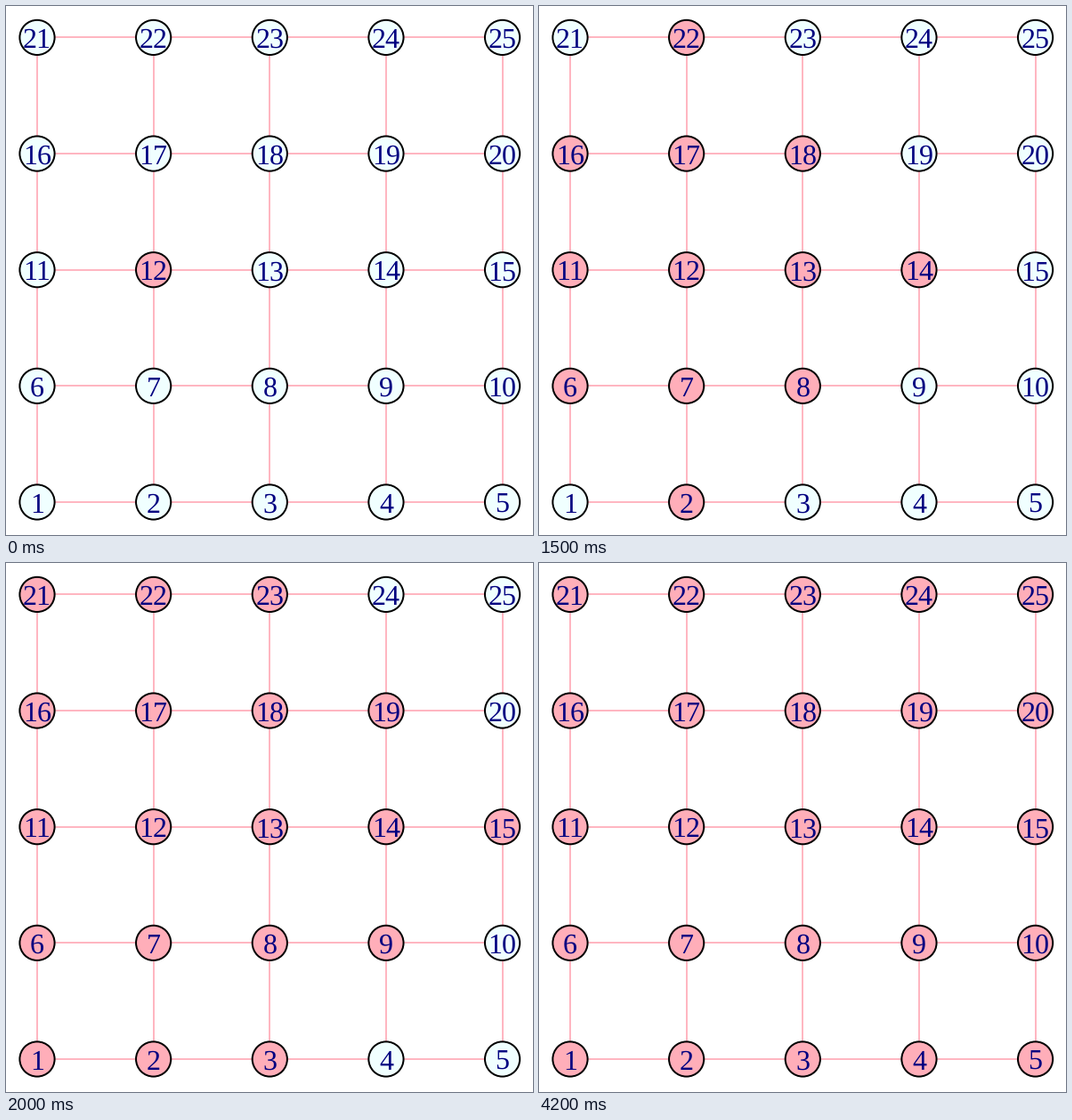
A matplotlib script that plays this animation: 592 by 595 pixels, repeating every 5 s.

```python
import matplotlib.pyplot as plt
from matplotlib.animation import FuncAnimation
from matplotlib.patches import Circle

W, H, DPI = 592, 595, 100
PX = 72 / DPI  # points per pixel

N = 5
LEFT, BOTTOM, GAP = 35.0, 558.0, 130.65
RADIUS = 19.6
START = (1, 2)  # column and row of node 12

IDLE, ACTIVE = "#f0ffff", "#ffaeb9"
EDGE, INK = "#ffb6c1", "#000080"

STEP_MS, FRAMES = 500, 10

plt.rcParams["text.hinting"] = "none"
plt.rcParams["toolbar"] = "None"

fig = plt.figure(figsize=(W / DPI, H / DPI), dpi=DPI, facecolor="white")
ax = fig.add_axes([0, 0, 1, 1])
ax.set_xlim(0, W)
ax.set_ylim(H, 0)
ax.axis("off")


def place(col, row):
    return LEFT + GAP * col, BOTTOM - GAP * row


def edge(a, b):
    (x0, y0), (x1, y1) = place(*a), place(*b)
    ax.plot([x0, x1], [y0, y1], color=EDGE, lw=2 * PX, zorder=1)


def node(col, row):
    x, y = place(col, row)
    disc = Circle((x, y), RADIUS, fc=IDLE, ec="black", lw=2 * PX, zorder=2)
    ax.add_patch(disc)
    ax.text(x, y + 11.5, str(row * N + col + 1), color=INK, ha="center",
            va="baseline", family="Liberation Serif", size=32 * PX, zorder=3)
    return disc


for k in range(N):
    edge((0, k), (N - 1, k))
    edge((k, 0), (k, N - 1))

nodes = {(c, r): node(c, r) for r in range(N) for c in range(N)}


def distance(col, row):
    return abs(col - START[0]) + abs(row - START[1])


def update(i):
    """The wave rests for two ticks, then spreads one edge per tick."""
    reach = max(0, i - 1)
    for pos, disc in nodes.items():
        disc.set_facecolor(ACTIVE if distance(*pos) <= reach else IDLE)
    return list(nodes.values())


anim = FuncAnimation(fig, update, frames=FRAMES, init_func=lambda: update(0),
                     interval=STEP_MS, repeat=True, repeat_delay=0, blit=False)
plt.show()
```
